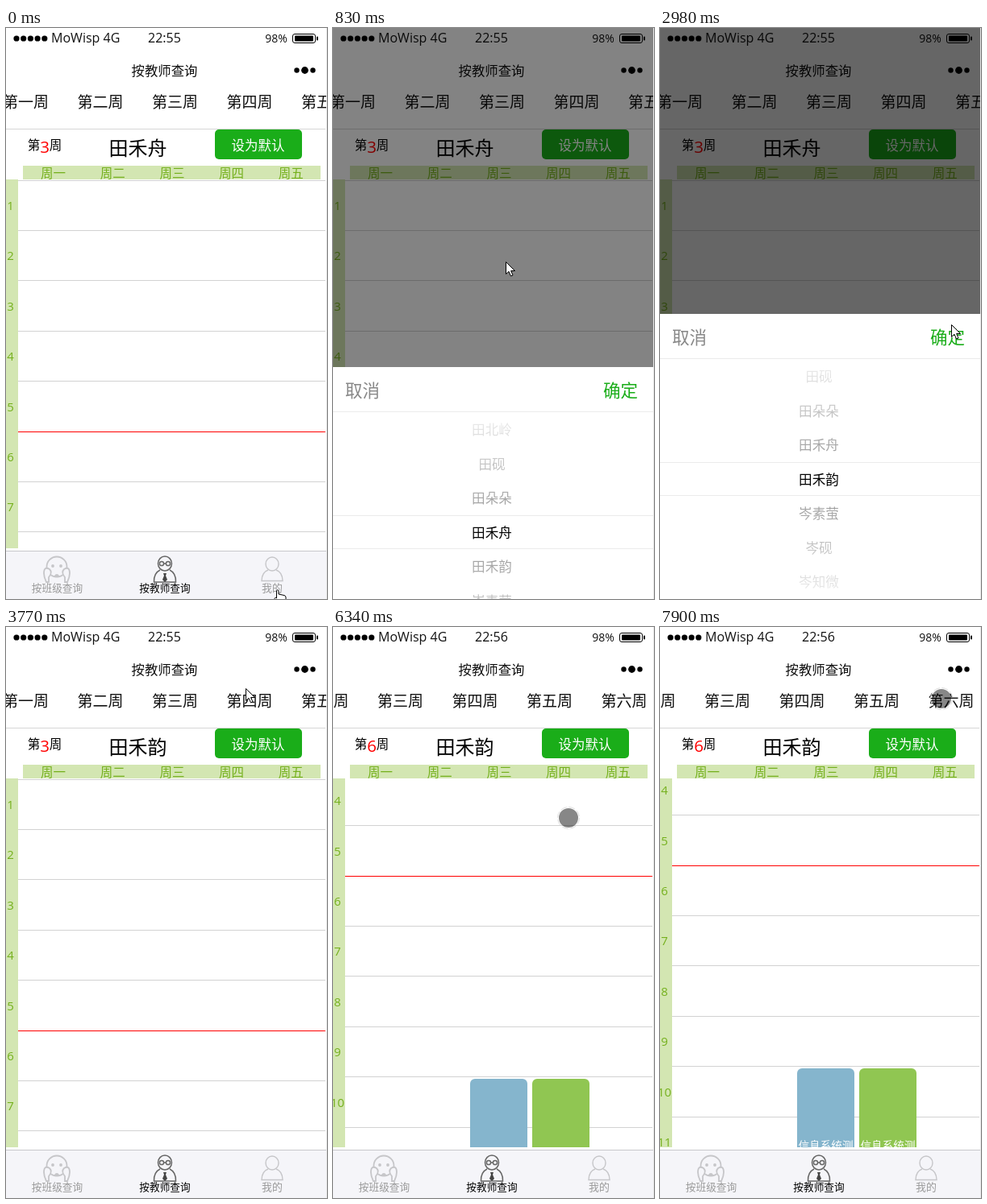
Write an HTML page that moves like this. It is 398 by 709 pixels and loops after 8000 ms.

```html
<!DOCTYPE html>
<html lang="zh-CN">
<head>
<meta charset="utf-8">
<title>按教师查询</title>
<style>
html, body { margin: 0; height: 100%; overflow: hidden; background: #fff; }
svg { display: block; width: 100vw; height: 100vh; }
text { font-family: "Open Sans", "Noto Sans CJK SC", "Noto Sans CJK", sans-serif; white-space: pre; }
</style>
</head>
<body>
<svg id="stage" viewBox="0 0 398 709"></svg>
<script>
const PITCH = 62.4, ROW = 42.5, GREEN = '#1aad19', PALE = '#d3e6b2', LEAF = '#74b01c';
const teachers = ['田北岭', '田砚', '田朵朵', '田禾舟', '田禾韵', '岑素萤', '岑砚', '岑知微'];
const digits = [...'一二三四五六七'];

// y is the middle of the glyphs
const text = (x, y, size, str, fill = '#000', more = 'text-anchor="middle"') =>
  `<text x="${x}" y="${y + size * .375}" font-size="${size}" fill="${fill}" ${more}>${str}</text>`;
const rect = (x, y, w, h, fill, more = '') =>
  `<rect x="${x}" y="${y}" width="${w}" height="${h}" fill="${fill}" ${more}/>`;
const dot = (x, y, r, more = '') => `<circle cx="${x}" cy="${y}" r="${r}" ${more}/>`;
const list = (n, fn) => Array.from({ length: n }, (_, i) => fn(i)).join('');
const left = 'text-anchor="start"';

const statusBar =
  list(5, i => dot(13 + i * 8.7, 13, 3.6)) +
  text(56, 12, 16, 'MoWisp 4G', '#111', left) +
  text(196.5, 12, 16, '22:55', '#111', 'id="clock" text-anchor="middle"') +
  text(335, 13, 14, '98%', '#111') +
  rect(355.5, 7.5, 28, 11, 'none', 'rx="2.5" stroke="#000"') +
  rect(358, 9.5, 23, 7, '#000', 'rx="1"') + rect(385, 10.5, 2, 5, '#000', 'rx="1"') +
  text(196.5, 52.5, 16.4, '按教师查询', '#111') +
  dot(360.5, 52.5, 3.2) + dot(370.5, 52.5, 4.4) + dot(380.5, 52.5, 3.2);

const weeks = `<g id="weeks">${list(7, i => text(24.5 + i * 92.5, 91.5, 19, `第${digits[i]}周`, '#111'))}</g>` +
  rect(0, 125, 396, 1, '#d6d6d6');

const heading =
  text(34.5, 145, 15.5, '第') + text(48, 147.5, 20.5, '3', '#f00', 'id="week" text-anchor="middle"') +
  text(61.5, 145, 15.5, '周') +
  text(163.5, 149, 24, teachers[3], '#000', 'id="teacher" text-anchor="middle"') +
  rect(259, 126, 108, 37, GREEN, 'rx="5"') +
  text(312.5, 146, 16.5, '设为默认', '#fff') +
  rect(21, 171, 369, 17, PALE) +
  list(5, i => text(58.5 + i * 73.7, 180, 15.5, '周' + digits[i], LEAF));

const card = (x, fill) => rect(x, 753, 71, 200, fill, 'rx="6"') +
  text(x + 35.5, 849, 13.6, '信息系统测', '#fff');

const table = rect(0, 188, 15, 458, PALE) +
  `<g clip-path="url(#body)"><g id="grid">` +
  list(12, i => rect(15, Math.round(188.6 + i * PITCH), 381, 1, i == 5 ? '#f00' : '#d2d2d2') +
    text(5.5, 220.3 + i * PITCH, 15, i + 1, LEAF)) +
  `<g id="cards">${card(170, '#85b5cd')}${card(247, '#90c652')}</g></g></g>`;

const BAR = '#f5f5f9';
const tabs = rect(0, 649, 397, 60, BAR) + rect(0, 649, 397, 1, '#c8c8cc') +
  `<g fill="none" stroke="#c6c6c9" stroke-width="1.8">
    <circle cx="63" cy="669" r="12.5"/>
    <g fill="${BAR}"><path d="M53 688V682Q58 676 54 672Q47 668 47 677Q47 682 50 688Z"/>
    <path d="M73 688V682Q68 676 72 672Q79 668 79 677Q79 682 76 688Z"/></g>
    <path d="M60.5 681Q63 677 65.5 681Z"/>
    <circle cx="58" cy="668" r="1"/><circle cx="68" cy="668" r="1"/>
    <g stroke-width="1.4"><ellipse cx="330" cy="665.5" rx="8" ry="8.5"/>
    <path d="M325 673Q317 676 317 686.5H343Q343 676 335 673"/></g>
  </g>
  <g fill="none" stroke="#666" stroke-width="1.5">
    <ellipse cx="197" cy="665" rx="8.5" ry="9"/>
    <path d="M196 665H198M191 673Q183 677 183.5 688H210.5Q211 677 203 673"/>
    <circle cx="193" cy="665" r="2.6"/><circle cx="201" cy="665" r="2.6"/>
    <path d="M195 677H199L198 680L200 685L197 688L194 685L196 680Z" fill="#444" stroke="none"/>
  </g>` +
  text(63.5, 695.5, 12.7, '按班级查询', '#999') + text(197, 695.5, 12.7, '按教师查询') +
  text(330, 695.5, 12.9, '我的', '#999');

const picker = rect(0, 0, 397, 709, '#000', 'id="shade"') +
  `<g id="sheet">` + rect(0, 0, 397, 354, '#fff') +
  `<g clip-path="url(#wheel)"><g id="names">` +
  teachers.map((name, i) => text(197, 205.5 + (i - 3) * ROW, 16.6, name)).join('') + `</g></g>` +
  rect(0, 56, 397, 128, 'url(#fadeTop)') + rect(0, 226, 397, 128, 'url(#fadeBottom)') +
  [55, 184, 225].map(y => rect(0, y, 397, 1, '#ebebeb')).join('') +
  text(36.5, 29, 21.5, '取消', '#888') + text(356.5, 29, 21.5, '确定', GREEN, 'text-anchor="middle" font-weight="500"') +
  `</g>`;

const fade = (id, from, to) => `<linearGradient id="${id}" x2="0" y2="1">
  <stop stop-color="#fff" stop-opacity="${from}"/><stop offset="1" stop-color="#fff" stop-opacity="${to}"/></linearGradient>`;

const pointers = `<g id="cursor">
  <path id="hand" fill="#fff" stroke="#000" d="M.5 1.5Q1.5 0 3 1.5V6L10 7.5Q12 8 12 10V14L10 18H3L-2 11.5Q-1 9 .5 11Z"/>
  <path id="arrow" fill="#fff" stroke="#000" d="M.5 .5V15.5L4 12.3L6.5 18L9 17L6.6 11.5H11.5Z"/>
  <g id="touch"><circle r="13.5" fill="none" stroke="#ddd" stroke-dasharray="8 2.6"/>
  <circle r="12" opacity=".47"/></g></g>`;

stage.innerHTML = `<defs>${fade('fadeTop', .95, .6)}${fade('fadeBottom', .6, .95)}
  <clipPath id="body">${rect(0, 188, 397, 458, '#000')}</clipPath>
  <clipPath id="wheel">${rect(0, 56, 397, 298, '#000')}</clipPath></defs>` +
  statusBar + weeks + heading + table + tabs + rect(397, 0, 1, 709, '#e8e8e8') + picker + pointers;

const $ = id => document.getElementById(id);
const move = (id, x, y) => $(id).setAttribute('transform', `translate(${x} ${y})`);
const show = (id, on) => $(id).setAttribute('display', on ? 'inline' : 'none');
const clamp = v => Math.min(1, Math.max(0, v));

// the standard "ease" curve, cubic-bezier(.25, .1, .25, 1)
function ease(x) {
  let lo = 0, hi = 1, s;
  for (let i = 0; i < 20; i++) {
    s = (lo + hi) / 2;
    if (.75 * s * (1 - s) + s ** 3 < x) lo = s; else hi = s;
  }
  return .3 * s * (1 - s) ** 2 + 3 * s * s * (1 - s) + s ** 3;
}

// keys: [time, value, ...]
function track(keys, t) {
  const n = keys.findIndex(k => k[0] > t);
  if (n == 0) return keys[0].slice(1);
  if (n < 0) return keys.at(-1).slice(1);
  const a = keys[n - 1], b = keys[n], p = (t - a[0]) / (b[0] - a[0]);
  return a.slice(1).map((v, i) => v + (b[i + 1] - v) * p);
}

const path = [
  [40, 335, 697], [600, 152, 140], [690, 152, 140], [830, 214, 290], [1520, 220, 560], [1910, 205, 542],
  [1980, 205, 542], [2250, 203, 500], [2390, 203, 500], [2680, 366, 343], [2830, 355, 374],
  [2910, 355, 374], [2980, 361, 368], [3130, 361, 368], [3770, 297, 76], [3979, 297, 76],
  [3980, 302, 90], [4400, 176, 90], [4640, 176, 89], [4950, 261, 89], [5270, 261, 89], [5340, 276, 88],
  [5650, 353, 93], [5810, 353, 93], [6040, 300, 429], [6090, 300, 429], [6340, 292, 237],
  [6420, 297, 220], [6570, 309, 214], [7040, 281, 87], [7430, 281, 87], [7670, 349, 89]
];

function draw(t) {
  const week = t < 5100 ? 3 : t < 5800 ? 5 : t < 7270 ? 6 : t < 7900 ? 5 : 6;
  $('clock').textContent = t < 4240 ? '22:55' : '22:56';
  $('week').textContent = week;
  $('teacher').textContent = teachers[t < 3150 ? 3 : 4];
  show('cards', week == 6);
  move('weeks', -track([[3980, 0], [4400, 126]], t)[0], 0);
  move('grid', 0, -Math.round(track([[6090, 0], [6340, 192], [6420, 205]], t)[0]));

  const open = ease(clamp((t - 677) / 300)) - ease(clamp((t - 3080) / 300));
  show('sheet', open > .001);
  $('shade').setAttribute('opacity', .6 * open);
  move('sheet', 0, Math.round(709 - 354 * open));
  move('names', 0, -track([[1980, 0], [2250, 38], [2480, ROW]], t)[0]);

  const [x, y] = track(path, t);
  move('cursor', x, y);
  show('hand', y > 649);
  show('arrow', y <= 649 && t < 3980);
  show('touch', t >= 3980);
}

let start;
function tick(now) {
  start ??= now;
  draw((now - start) % 8000);
  requestAnimationFrame(tick);
}
draw(0);
requestAnimationFrame(tick);
</script>
</body>
</html>
```
